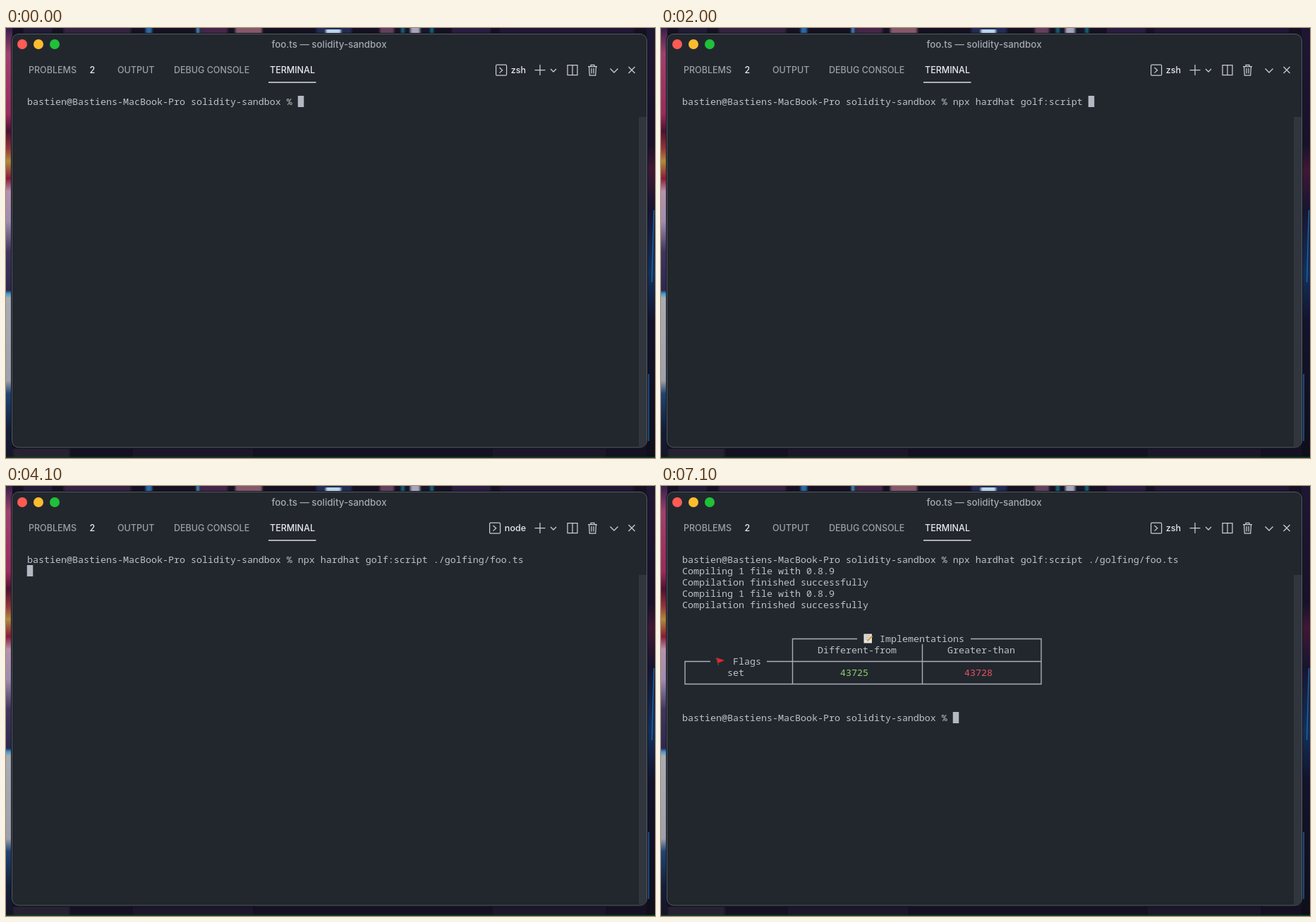
Recreate the animation shown at these times as an HTML page. Size 920 by 609 pixels, loop 7.45 s.

```html
<!DOCTYPE html>
<html lang="en">
<head>
<meta charset="utf-8">
<title>Terminal</title>
<style>
  html, body { margin: 0; width: 100%; height: 100%; overflow: hidden; background: #151123; }
  svg { display: block; width: 920px; height: 609px; }
  text { white-space: pre; }
  .ui { font: 500 12.5px Inter, "Open Sans", sans-serif; fill: #9a9fa8; }
  .ui .on { fill: #e9eaec; }
  .ui .title { font-size: 13.35px; fill: #a3a8b0; }
  .mono { font: 500 13.333px "Noto Sans Mono", "DejaVu Sans Mono", monospace; fill: #bdc2ca; }
  .icon { fill: none; stroke: #c9ccd1; stroke-width: 1.25; }
  .table { fill: none; stroke: #a9aeb7; stroke-width: 1.4; }
</style>
</head>
<body>
<svg viewBox="0 0 920 609">
  <defs>
    <linearGradient id="left" x2="0" y2="1">
      <stop offset="0" stop-color="#35204a"/>
      <stop offset=".06" stop-color="#a04070"/>
      <stop offset=".2" stop-color="#9a2a5c"/>
      <stop offset=".24" stop-color="#4c1230"/>
      <stop offset=".28" stop-color="#94343a"/>
      <stop offset=".31" stop-color="#b08a3a"/>
      <stop offset=".35" stop-color="#8c1a3a"/>
      <stop offset=".38" stop-color="#b592ac"/>
      <stop offset=".45" stop-color="#a08cae"/>
      <stop offset=".52" stop-color="#40355f"/>
      <stop offset=".61" stop-color="#2d2850"/>
      <stop offset=".618" stop-color="#3f9bd0"/>
      <stop offset=".628" stop-color="#a9acb3"/>
      <stop offset=".82" stop-color="#9da1aa"/>
      <stop offset=".85" stop-color="#1f4474"/>
      <stop offset=".93" stop-color="#131f3a"/>
      <stop offset="1" stop-color="#161426"/>
    </linearGradient>
    <linearGradient id="right" x2="0" y2="1">
      <stop offset="0" stop-color="#1e1733"/>
      <stop offset=".27" stop-color="#171229"/>
      <stop offset=".33" stop-color="#3f1834"/>
      <stop offset=".42" stop-color="#171530"/>
      <stop offset=".57" stop-color="#12305c"/>
      <stop offset=".68" stop-color="#13142c"/>
      <stop offset="1" stop-color="#0f0e1a"/>
    </linearGradient>
    <filter id="soft"><feGaussianBlur stdDeviation="1.5 .7"/></filter>
  </defs>
  <rect width="920" height="609" fill="#151123"/>
  <g id="wall" filter="url(#soft)"></g>
  <rect width="9" height="609" fill="url(#left)"/>
  <rect x="908" width="12" height="609" fill="url(#right)"/>
  <path d="M918.5 258L915.5 360M911 490V585" fill="none" stroke="#1f62a0" stroke-width="1.5"/>
  <path d="M0 608.3H920" stroke="#12451f" stroke-width="1.4"/>

  <rect x="7" y="7" width="903" height="588.5" rx="10.5" fill="#10131a"/>
  <rect x="8.5" y="8.5" width="900" height="585.5" rx="9.5" fill="#22272e" stroke="#555a62"/>
  <path d="M897 126H908V585Q908 590 904 593.4H897Z" fill="#30353e"/>
  <circle cx="23" cy="23" r="7" fill="#ff5b55"/>
  <circle cx="46" cy="23" r="7" fill="#fdbc2e"/>
  <circle cx="69" cy="23" r="7" fill="#1fc138"/>

  <g class="ui">
    <text x="458" y="27.8" text-anchor="middle" class="title">foo.ts — solidity-sandbox</text>
    <text x="32" y="64.3">PROBLEMS</text>
    <text x="118.5" y="64.3" class="on">2</text>
    <text x="158" y="64.3">OUTPUT</text>
    <text x="238" y="64.3">DEBUG CONSOLE</text>
    <text x="374" y="64.3" class="on">TERMINAL</text>
    <text id="shell" x="737" y="64.3" text-anchor="end" class="on"></text>
  </g>
  <path d="M372 77H439.5" stroke="#dcdde0" stroke-width="1.3"/>
  <g class="icon">
    <g id="box">
      <rect x=".6" y="52.2" width="15" height="15" rx="1.5"/>
      <path d="M5.5 56L9.7 59.8L5.5 63.6"/>
    </g>
    <path d="M749.5 59.5H764.5M757 52V67M772 58L776 62L780 58"/>
    <path d="M796 52.5H810V66.5H796ZM803 52.5V66.5"/>
    <path d="M825 54.5H838M829 54V52.3H834V54M826.5 54.5L827.3 67H835.7L836.5 54.5M830 57V64.5M833 57V64.5"/>
    <path d="M856.5 57.5L862 63L867.5 57.5M882.5 55L891.5 64M891.5 55L882.5 64"/>
  </g>

  <g id="lines" class="mono"></g>
  <g id="table">
    <path class="table" d="M278 216.5H186.5V280.5M439 216.5H539V280.5H34V248.5H70M150 248.5H539M370.5 224V280.5"/>
    <g class="mono">
      <text x="310" y="220.5">Implementations</text>
      <text x="222" y="236.5">Different-from</text>
      <text x="406" y="236.5">Greater-than</text>
      <text x="102" y="252.5">Flags</text>
      <text x="94" y="268.5">set</text>
      <text x="254" y="268.5" fill="#8fd06d">43725</text>
      <text x="430" y="268.5" fill="#e5535f">43728</text>
    </g>
    <path d="M287.5 209.5H299V222.5H287.5Z" fill="#e6e4df"/>
    <path d="M289 212H297M289 214.5H295M289 217H293" stroke="#a5a8ad" stroke-width=".8"/>
    <path d="M292.5 219.5L299.5 212.5" stroke="#d99a35" stroke-width="2.2"/>
    <path d="M78.5 243L90 247L80.5 251Z" fill="#e0262c"/>
    <path d="M78.5 243L81.5 254" stroke="#6b4a3c" stroke-width="1.2"/>
  </g>
  <rect id="cursor" width="8.5" height="16" fill="#b4b8c3"/>
</svg>
<script>
const $ = id => document.getElementById(id);
const LOOP = 7450, CELL = 8, ROW = 16, LEFT = 30;
const prompt = "bastien@Bastiens-MacBook-Pro solidity-sandbox % ";
const command = "npx hardhat golf:script ./golfing/foo.ts ";
// [time, characters typed], including the two tab completions
const keys = [[2150, 25], [2300, 26], [2650, 27], [2750, 28], [2900, 34], [3200, 35], [3250, 36], [3350, 41]];
const ENTER = 3500, TABLE = 6100, DONE = 6350;
const output = [
  [5150, "Compiling 1 file with 0.8.9"], [5250, "Compilation finished successfully"],
  [6050, "Compiling 1 file with 0.8.9"], [6050, "Compilation finished successfully"]
];

// Blurred hints of the wallpaper: x, y, width, colour
const patches = [
  [25, 0, 40, "#221a38"], [82, 0, 95, "#34223f"], [198, 0, 9, "#2b68a8"],
  [270, 0, 4, "#4a8fc0"], [276, 0, 38, "#44264a"], [325, 0, 38, "#85586a"],
  [440, 0, 50, "#232c55"], [454, 2, 20, "#b9d5ec"], [530, 0, 20, "#63405f"],
  [560, 0, 46, "#17677f"], [564, 0, 38, "#14132a"], [574, 0, 12, "#a9a5bb"],
  [632, 0, 55, "#2a1d40"], [700, 0, 190, "#201836"],
  [10, 596, 80, "#262233"], [180, 596, 170, "#1b182c"], [690, 596, 160, "#1a1629"]
];
$("wall").innerHTML = patches.map(([x, y, w, c]) =>
  `<rect x="${x}" y="${y}" width="${w}" height="${y > 500 ? 12 : 8 - y}" fill="${c}"/>`).join("");

function typedCount(t) {
  if (t < 2150) return Math.max(0, Math.min(24, Math.floor(13 + (t - 1100) * 11 / 900)));
  return keys.filter(k => k[0] <= t).pop()[1];
}

function draw(t) {
  const rows = [prompt + command.slice(0, typedCount(t))];
  if (t >= ENTER) {
    for (const [start, line] of output) if (t >= start) rows.push(line);
    rows.push("");
  }
  if (t >= TABLE) rows[13] = "";
  if (t >= DONE) rows[14] = prompt;

  $("lines").innerHTML = Array.from(rows, (s, i) =>
    s ? `<text x="${LEFT}" y="${108.5 + i * ROW}">${s}</text>` : "").join("");
  const last = rows.length - 1;
  $("cursor").setAttribute("x", LEFT + rows[last].length * CELL - .25);
  $("cursor").setAttribute("y", 96 + last * ROW);
  $("table").style.display = t >= TABLE ? "" : "none";

  const running = t >= ENTER + 50 && t < DONE + 50;
  $("shell").textContent = running ? "node" : "zsh";
  $("box").setAttribute("transform", `translate(${running ? 685 : 694})`);
}

const begin = performance.now();
function frame() {
  const t = (performance.now() - begin) % LOOP;
  draw(Math.floor(t / 50) * 50);
  requestAnimationFrame(frame);
}
frame();
</script>
</body>
</html>
```
